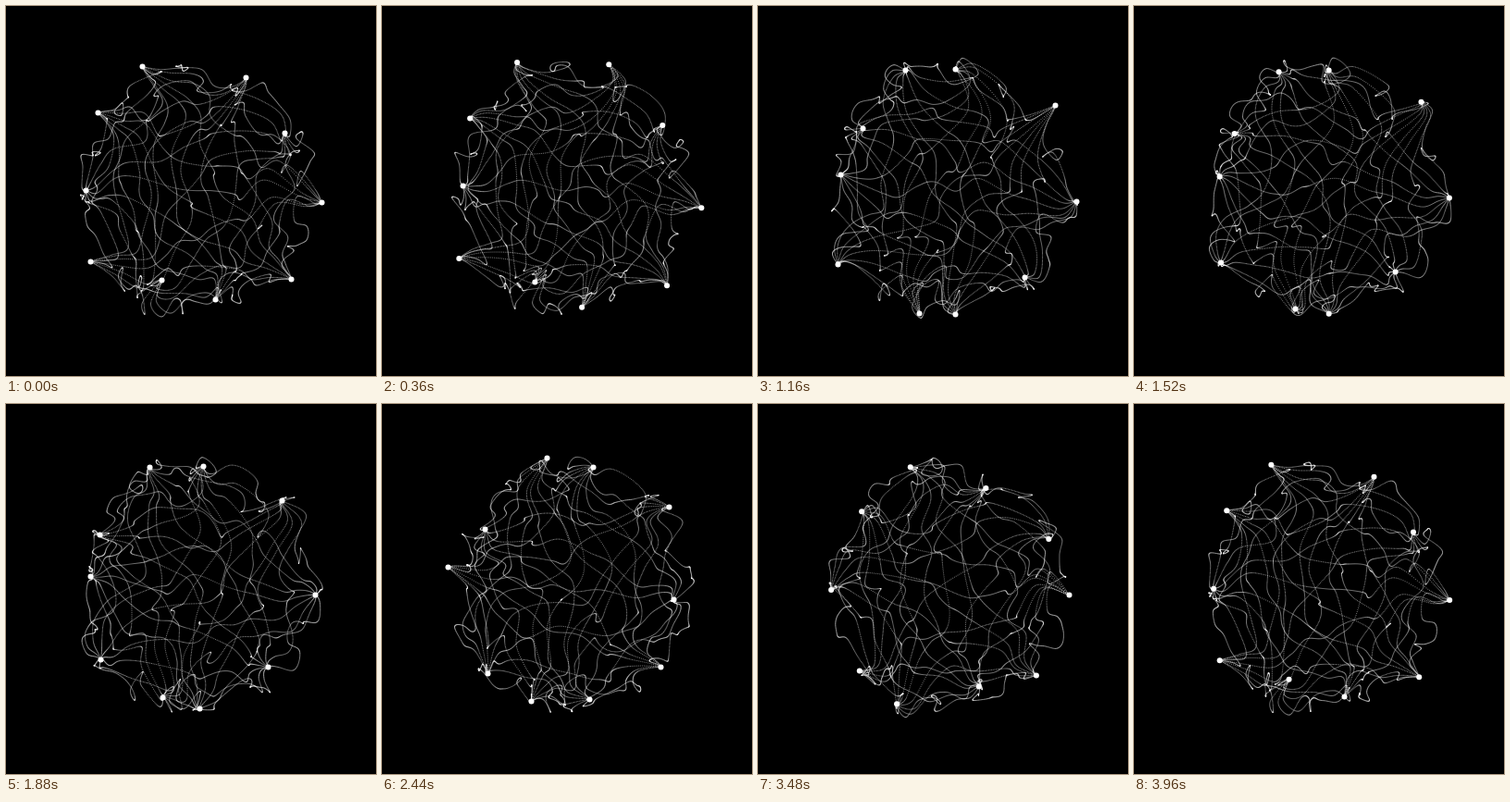
An HTML page with a canvas that plays this animation: 400 px wide and 400 px high, repeating every 4000 ms.

```html
<!DOCTYPE html>
<html lang="en">
<head>
<meta charset="utf-8">
<title>Delayed node web</title>
<style>
html, body { margin: 0; width: 100%; height: 100%; overflow: hidden; background: #000; }
canvas { display: block; width: 100vmin; height: 100vmin; margin: 0 auto; }
</style>
</head>
<body>
<canvas id="stage" width="400" height="400"></canvas>
<script>
const LOOP = 4000, STEP = 40;
const DELAY = 1.5;   // loops of lag from one end of a thread to the other
const DOTS = 220;    // dots per thread

// Each node drifts on a closed smooth path through these knots.
const TIMES = [0, 0.18, 0.29, 0.47, 0.61, 0.75, 0.88];
const KNOTS = [
  [[147, 65], [150, 59], [159, 69], [155, 68], [178, 58], [178, 62], [163, 68]],
  [[259, 77], [225, 55], [213, 68], [213, 67], [228, 68], [233, 90], [247, 90]],
  [[301, 137], [310, 119], [321, 107], [298, 104], [310, 111], [321, 128], [313, 146]],
  [[341, 212], [347, 220], [344, 211], [334, 206], [315, 211], [318, 188], [337, 207]],
  [[308, 295], [302, 305], [288, 293], [283, 284], [301, 284], [294, 294], [301, 293]],
  [[226, 317], [209, 331], [213, 333], [209, 329], [224, 319], [234, 317], [238, 305]],
  [[168, 296], [161, 311], [174, 332], [169, 317], [161, 321], [155, 339], [150, 322]],
  [[91, 276], [80, 273], [86, 279], [102, 276], [114, 291], [122, 301], [108, 287]],
  [[86, 199], [87, 188], [89, 182], [91, 186], [71, 176], [76, 186], [79, 201]],
  [[99, 115], [97, 128], [113, 132], [101, 141], [111, 135], [115, 113], [111, 116]]
];
const COUNT = TIMES.length;
const wrap = i => (i + COUNT) % COUNT;
const span = i => (wrap(i + 1) ? TIMES[wrap(i + 1)] : 1) - TIMES[wrap(i)];

// Slope at a knot from the parabola through its neighbours.
function slope(knots, i, axis) {
  const a = span(i - 1), b = span(i);
  const left = (knots[i][axis] - knots[wrap(i - 1)][axis]) / a;
  const right = (knots[wrap(i + 1)][axis] - knots[i][axis]) / b;
  return (left * b + right * a) / (a + b);
}

const paths = KNOTS.map(knots => ({
  knots,
  slopes: knots.map((_, i) => [slope(knots, i, 0), slope(knots, i, 1)])
}));

function place(path, time) {
  const t = time - Math.floor(time);
  let i = COUNT - 1;
  while (TIMES[i] > t) i--;
  const j = wrap(i + 1), h = span(i), u = (t - TIMES[i]) / h;
  const v = 1 - u;
  const p = v * v * (1 + 2 * u), q = u * u * (3 - 2 * u);
  const m = h * u * v * v, n = -h * u * u * v;
  const { knots, slopes } = path;
  const at = k => p * knots[i][k] + q * knots[j][k] + m * slopes[i][k] + n * slopes[j][k];
  return [at(0), at(1)];
}

const ctx = document.getElementById("stage").getContext("2d");

function draw(t) {
  ctx.fillStyle = "#000";
  ctx.fillRect(0, 0, 400, 400);

  // Positions of every node over the lag, shared by all threads.
  const trails = paths.map(path =>
    Array.from({ length: DOTS + 1 }, (_, k) => place(path, t - DELAY * k / DOTS)));

  ctx.fillStyle = "rgba(255,255,255,.45)";
  for (let a = 0; a < trails.length; a++) {
    for (let b = 0; b < a; b++) {
      for (let k = 0; k <= DOTS; k++) {
        const w = k / DOTS, p = trails[a][k], q = trails[b][DOTS - k];
        ctx.fillRect(p[0] + (q[0] - p[0]) * w, p[1] + (q[1] - p[1]) * w, 1, 1);
      }
    }
  }

  ctx.fillStyle = "#fff";
  for (const trail of trails) {
    ctx.beginPath();
    ctx.arc(trail[0][0] + 0.5, trail[0][1] + 0.5, 3, 0, Math.PI * 2);
    ctx.fill();
  }
}

const start = performance.now();
let last = -1;
function tick() {
  const step = Math.floor((performance.now() - start) % LOOP / STEP);
  if (step !== last) draw(step * STEP / LOOP);
  last = step;
  requestAnimationFrame(tick);
}
tick();
</script>
</body>
</html>
```
